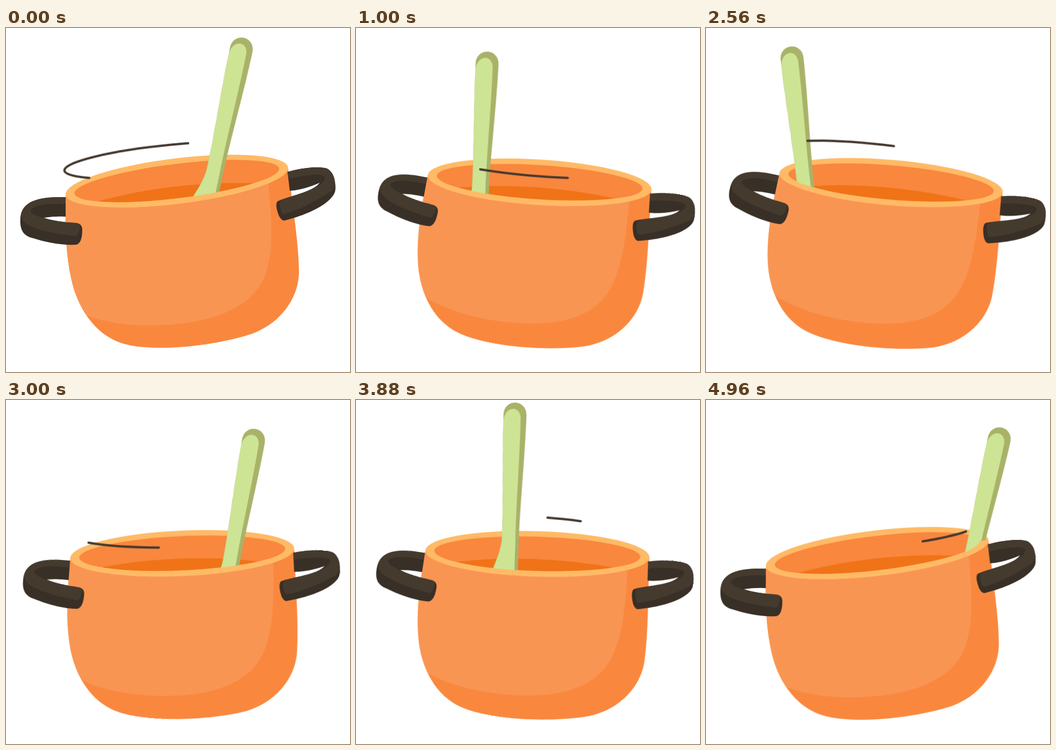
An HTML page without scripts that plays this animation: 600 px wide and 600 px high, repeating every 5 s.

```html
<!DOCTYPE html>
<html lang="en">
<head>
<meta charset="utf-8">
<title>Stirring soup</title>
<style>
html, body { margin: 0; width: 100%; height: 100%; overflow: hidden; background: #fff; }
svg { display: block; width: 100%; height: 100%; }

.rim { fill: #ffba66; }
.inside { fill: #f9873e; }
.soup { fill: #f07318; }
.shade { fill: #f9883e; }
.light { fill: #f99552; }
.grip { fill: #382f26; }
.grip-top { fill: #453a2e; }
.spoon-edge { fill: #a9b268; }
.spoon-face { fill: #cde495; }

.sway {
  transform-origin: 298px 388px;
  animation: sway calc(5s / 6) cubic-bezier(.38, .15, .62, .85) infinite alternate;
}
.sway.near { transform-origin: 298px 310px; }
@keyframes sway { to { transform: rotate(12.3deg); } }

/* right -> back -> left -> front, three laps */
.spoon { animation: stir 5s linear infinite; }
@keyframes stir {
  0% { transform: translate(415px, 17px) rotate(12deg); }
  6% { transform: translate(345px, 5px) rotate(7deg); }
  11.6% { transform: translate(260px, 0) rotate(1deg); }
  15.6% { transform: translate(158px, 18px) rotate(-6deg); }
  17.9% { transform: translate(147px, 32px) rotate(-6.4deg); }
  20% { transform: translate(229px, 41px) rotate(2.8deg); }
  25% { transform: translate(400px, 52px) rotate(9deg); }
  30% { transform: translate(503px, 54px) rotate(12.5deg); }
  32.5% { transform: translate(516px, 48px) rotate(12.5deg); }
  33.6% { transform: translate(508px, 45px) rotate(11.5deg); }
  35.2% { transform: translate(472px, 29px) rotate(8.6deg); }
  38.5% { transform: translate(410px, 14px) rotate(8.5deg); }
  44.9% { transform: translate(260px, 2px) rotate(1deg); }
  48.9% { transform: translate(158px, 18px) rotate(-6deg); }
  51.2% { transform: translate(147px, 32px) rotate(-6.4deg); }
  53.3% { transform: translate(229px, 41px) rotate(2.8deg); }
  58.3% { transform: translate(400px, 50px) rotate(9deg); }
  63.3% { transform: translate(503px, 51px) rotate(12.5deg); }
  66% { transform: translate(514px, 45px) rotate(12.5deg); }
  68.8% { transform: translate(468px, 30px) rotate(8.8deg); }
  72% { transform: translate(408px, 14px) rotate(8.5deg); }
  78.4% { transform: translate(260px, 3px) rotate(1deg); }
  82.4% { transform: translate(158px, 18px) rotate(-6deg); }
  84.5% { transform: translate(147px, 32px) rotate(-5.5deg); }
  87.2% { transform: translate(252px, 38px) rotate(5.7deg); }
  92% { transform: translate(400px, 50px) rotate(9.5deg); }
  96% { transform: translate(500px, 54px) rotate(12.5deg); }
  99.2%, 100% { transform: translate(516px, 48px) rotate(12.5deg); }
}

.swirl {
  fill: none;
  stroke: #463a30;
  stroke-width: 4;
  stroke-linecap: round;
  animation: swirl 5s linear infinite;
}
@keyframes swirl {
  0% { stroke-dasharray: 35 200; stroke-dashoffset: -21; }
  20% { stroke-dasharray: 19.7 200; stroke-dashoffset: -63.9; }
  35.2% { stroke-dasharray: 6.5 200; stroke-dashoffset: -93.5; }
  37% { stroke-dasharray: 0 200; stroke-dashoffset: -100; }
  37.01% { stroke-dasharray: 0 200; stroke-dashoffset: 0; }
  51.2% { stroke-dasharray: 19.5 200; stroke-dashoffset: -22.5; }
  68.8% { stroke-dasharray: 12 200; stroke-dashoffset: -88; }
  71.5% { stroke-dasharray: 0 200; stroke-dashoffset: -100; }
  71.51% { stroke-dasharray: 0 200; stroke-dashoffset: 0; }
  87.2% { stroke-dasharray: 19 200; stroke-dashoffset: -35; }
  99.2%, 100% { stroke-dasharray: 10 200; stroke-dashoffset: -86; }
}
</style>
</head>
<body>
<svg viewBox="0 0 600 600">
  <defs>
    <path id="body" d="M104 290.800C103 350 104 410 120 460C138 512 172 543 210 552C270 566 370 553 430 533C480 514 511 470 511 425C511 380 500 310 491.900 243.200A195.400 39.600 -7 0 1 104 290.800Z"/>
    <clipPath id="body-clip"><use href="#body"/></clipPath>
    <clipPath id="mouth-clip"><ellipse rx="180" ry="30" transform="translate(298 267) rotate(-7)"/></clipPath>
  </defs>

  <g class="sway">
    <g transform="translate(298 267) rotate(-7)">
      <ellipse class="rim" rx="195.400" ry="39.600"/>
      <ellipse class="inside" rx="180" ry="30"/>
    </g>
    <path class="soup" clip-path="url(#mouth-clip)" d="M155 304C235 281 335 267 445 271V330H155Z"/>
  </g>

  <g class="spoon">
    <path class="spoon-edge" d="M-20 22C-20 -7 20 -7 20 22C20 90 14 180 14 240V320H-38C-30 285 -16 265 -15.500 235C-15 180 -20 90 -20 22Z"/>
    <path class="spoon-face" d="M-20 32C-17 6 8 5 10 26C11 100 7 180 8 240V320H-38C-30 285 -16 265 -15.500 235C-15 180 -19.500 90 -20 32Z"/>
  </g>

  <g class="sway">
    <use class="shade" href="#body"/>
    <path class="light" clip-path="url(#body-clip)" d="M90 250H455C465 330 465 385 457 412C445 478 380 508 300 516C240 523 180 517 137 500L90 480Z"/>
    <path class="rim" transform="translate(298 267) rotate(-7)" d="M-195.400 0A195.400 39.600 0 0 0 195.400 0H180A180 30 0 0 1 -180 0Z"/>

    <path class="grip" d="M104 295C60 294 27 300 25 332C24 352 30 362 45 366C70 374 95 379 122 378Q133 376 133 352Q133 341 122 340C100 339 80 336 66 331Q85 328 104 329Z"/>
    <path class="grip-top" d="M104 295C60 294 28 302 26 328C28 345 60 356 122 363Q128 360 129 345Q128 341 120 340C85 338 40 328 43 318C48 308 80 305 104 307Z"/>

    <path class="grip" d="M491 251C520 243 545 241 560 245C574 253 576 275 574 285C568 305 530 325 485 336Q478 335 474 322Q469 306 474 302Q480 299 497 294C520 287 540 280 547 270Q520 282 495 284Z"/>
    <path class="grip-top" d="M491 251C520 243 550 240 563 247C577 258 576 280 565 286C540 302 510 318 484 325Q478 320 477 304Q480 299 497 294C520 287 558 275 556 260C553 252 520 257 493 263Z"/>
  </g>

  <g class="sway near">
    <path class="swirl" pathLength="100" transform="translate(290 230.500) rotate(-5.500)" d="M189 0A189 27 0 0 0 -189 0A189 27 0 0 0 189 0"/>
  </g>
</svg>
</body>
</html>
```
